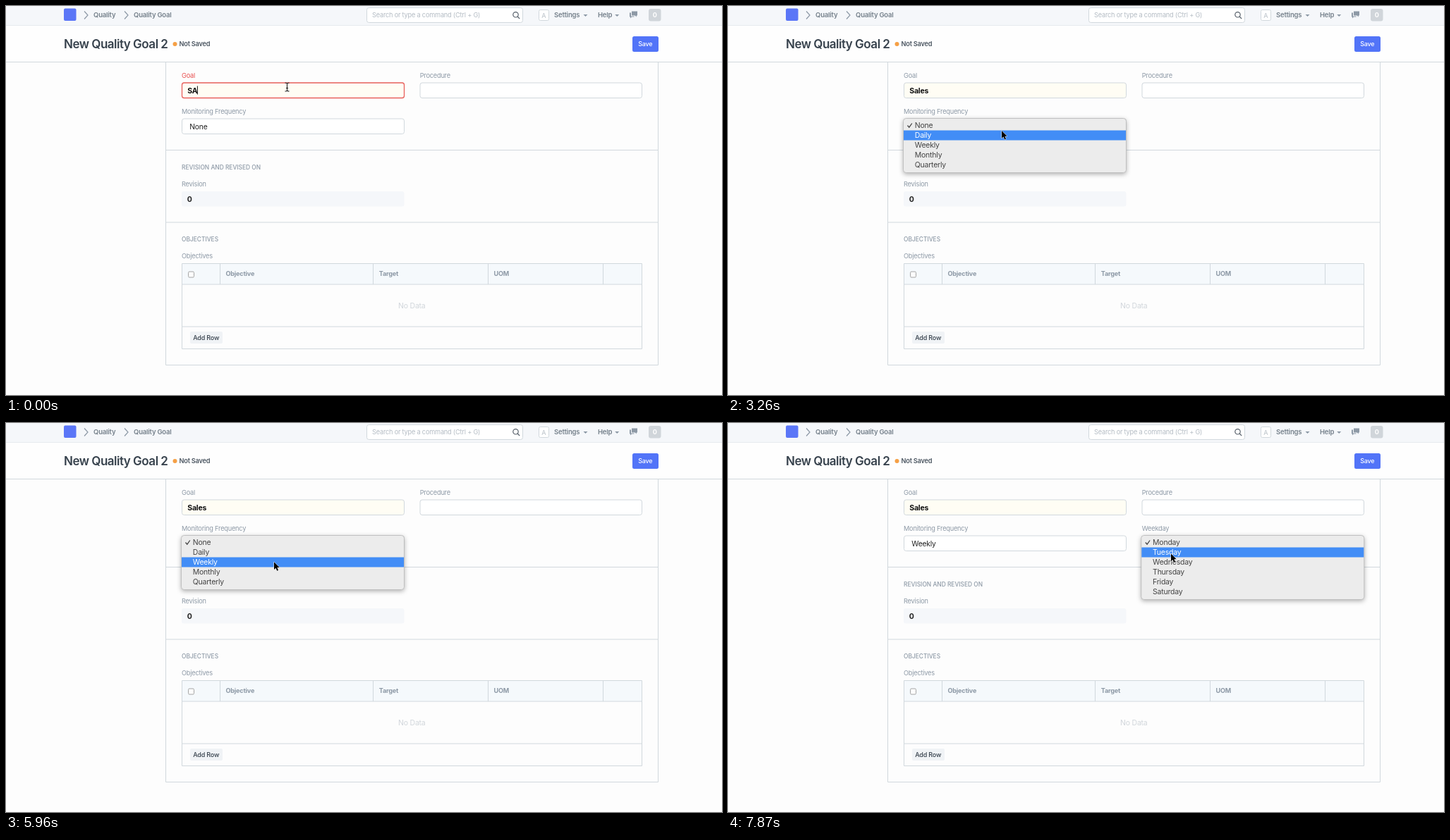
An HTML page that plays this animation: 1015x552 px, repeating every 8000 ms.

```html
<!DOCTYPE html>
<html lang="en">
<head>
<meta charset="utf-8">
<title>New Quality Goal</title>
<style>
  html, body { margin: 0; width: 100%; height: 100%; overflow: hidden; background: #fdfdfd; }
  svg { display: block; width: 100%; height: 100%; }
  text { font-family: Inter, sans-serif; letter-spacing: -.022em; white-space: pre; fill: #8d99a6; font-size: 9.2px; }
  .nav { font-size: 9.5px; font-weight: 600; fill: #75808b; }
  .section { font-size: 8.4px; font-weight: 500; letter-spacing: 0; }
  .head { font-size: 9.1px; font-weight: 700; }
  .value { font-size: 10.3px; fill: #222; }
  .bold { font-size: 10.5px; font-weight: 700; fill: #111; }
  .item { font-size: 10.5px; fill: #444; }
  .mid { text-anchor: middle; }
  .line { fill: none; stroke: #d1d8dd; }
  .field { fill: #fff; stroke: #d1d8dd; }
  .popup { filter: drop-shadow(0 2px 3px rgba(0, 0, 0, .3)); }
  .tick { fill: none; stroke: #444; stroke-width: 1.3; }
  .on { fill: #fff; }
  .tick.on { fill: none; stroke: #fff; }
</style>
</head>
<body>
<svg viewBox="0 0 1015 552">
  <!-- Navigation bar -->
  <rect width="1015" height="27" fill="#f5f7fa"/>
  <path class="line" d="M0 27.5H1015" style="stroke:#e6eaee"/>
  <rect x="82" y="3.5" width="17.5" height="17.5" rx="2" fill="#5b76f7"/>
  <path d="M111 7.5l5 5.5-5 5.5M168 7.5l5 5.5-5 5.5" fill="none" stroke="#8d99a6" stroke-width="1.2"/>
  <text class="nav" x="124" y="16.4">Quality</text>
  <text class="nav" x="181" y="16.4">Quality Goal</text>
  <rect class="field" x="511.5" y="2.5" width="221" height="21" rx="3"/>
  <text x="519" y="16.4" style="fill:#b4bcc4">Search or type a command (Ctrl + G)</text>
  <g fill="none" stroke="#555f69" stroke-width="1.2"><circle cx="722.5" cy="12.3" r="3.7"/><path d="M725.2 15l3 3.2"/></g>
  <rect class="field" x="755.5" y="5.5" width="14" height="15" rx="2"/>
  <text class="mid" x="762.3" y="16.5" style="fill:#b9c1c8">A</text>
  <text class="nav" x="777" y="16.4">Settings</text>
  <text class="nav" x="839" y="16.4">Help</text>
  <path d="M818.5 12h6l-3 3zM863.2 12h6l-3 3z" fill="#8d99a6"/>
  <path d="M887 7.5h8v6h-1.2v2l-2-2H887zM884 9.5h2v5h4.5v1H887l-2 2v-2h-1z" fill="#8d99a6"/>
  <rect x="911" y="4" width="17.5" height="17.5" rx="3" fill="#d0d5da"/>
  <text class="head mid" x="919.7" y="16" style="fill:#fff">0</text>

  <!-- Page header -->
  <rect y="28" width="1015" height="51" fill="#fefefe"/>
  <path class="line" d="M0 79.5H1015"/>
  <text x="82" y="60.4" style="font-size:17px;font-weight:600;letter-spacing:-.5px;fill:#36414c">New Quality Goal 2</text>
  <circle cx="239.5" cy="54" r="3" fill="#f5a045"/>
  <text x="245.5" y="57.2" style="font-weight:600;fill:#4a5560">Not Saved</text>
  <rect x="888" y="43" width="37" height="22" rx="2.5" fill="#5274f8"/>
  <text class="mid" x="906.3" y="57.2" style="font-size:9px;font-weight:500;fill:#fff">Save</text>

  <!-- Form -->
  <path class="line" d="M226.5 80V509.5H924.5V80M226.5 204.5H924.5M226.5 307H924.5"/>
  <text id="goalLabel" x="249" y="102">Goal</text>
  <rect id="goalField" x="249.5" y="109" width="315" height="21.5" rx="3" fill="#fffdf4"/>
  <text id="goal" class="bold" x="257.3" y="123.5"></text>
  <path id="caret" d="M0 113.5V125.5" stroke="#111"/>
  <text x="586.7" y="102">Procedure</text>
  <rect class="field" x="587" y="109" width="314.5" height="21.5" rx="3"/>
  <text x="249" y="153">Monitoring Frequency</text>
  <rect class="field" x="249.5" y="160" width="315" height="21.5" rx="3"/>
  <rect id="focusRing" x="257.5" y="163.5" width="299" height="14.5" fill="none" stroke="#8f8f8f" stroke-width=".8"/>
  <text id="frequency" class="value" x="260.3" y="175"></text>
  <g id="weekday">
    <text x="586.7" y="153">Weekday</text>
    <rect class="field" x="587" y="160" width="314.5" height="21.5" rx="3"/>
    <text class="value" x="597.8" y="175">Monday</text>
  </g>
  <text class="section" x="249" y="231.5">REVISION AND REVISED ON</text>
  <text x="249" y="255.5">Revision</text>
  <rect x="249" y="263" width="315.5" height="21.5" rx="3" fill="#f5f7fa"/>
  <text class="bold" x="256.8" y="278" style="fill:#222">0</text>

  <!-- Objectives table -->
  <text class="section" x="249" y="334">OBJECTIVES</text>
  <text x="249" y="358.3">Objectives</text>
  <rect x="249.5" y="365.5" width="652" height="29.5" fill="#f5f9fc"/>
  <path class="line" d="M249.5 365.5H901.5V486.5H249.5ZM249.5 395H901.5M249.5 455H901.5M303.5 365.5V395M520.5 365.5V395M683.5 365.5V395M846.5 365.5V395"/>
  <rect x="258.5" y="377" width="8" height="8" rx="1.5" fill="#fff" stroke="#9a9a9a" stroke-width=".9"/>
  <text class="head" x="311.5" y="383">Objective</text>
  <text class="head" x="528.7" y="383">Target</text>
  <text class="head" x="691.5" y="383">UOM</text>
  <text class="mid" x="575.3" y="428.7" style="font-size:10.5px;fill:#d1d6db">No Data</text>
  <rect x="261" y="462" width="46" height="17" rx="2" fill="#f0f3f6"/>
  <text class="mid" x="283.7" y="473.7" style="font-size:9px;font-weight:500;fill:#36414c">Add Row</text>

  <g id="frequencyMenu" class="popup"></g>
  <g id="weekdayMenu" class="popup"></g>
  <path id="beam" d="M-3-6Q0-6 0-4.5Q0-6 3-6M0-5V5M-3 6Q0 6 0 4.5Q0 6 3 6M-1.5 1.5H1.5" fill="none" stroke="#222" stroke-width="1.1"/>
  <path id="arrow" d="M0 0V10.8L2.5 8.5 4.2 12.4 6 11.6 4.4 7.8H7.7Z" stroke="#fff" stroke-width="1" paint-order="stroke"/>
</svg>
<script>
const LOOP = 8000, ROW = 14, MENU_TOP = 162.5;
const $ = id => document.getElementById(id);

// Each step holds its value from its start time until the next one.
const typing = [[0, 'SA'], [150, 'S'], [300, 'Sa'], [440, 'Sale'], [740, 'Sales'], [880, 'Sales '], [1620, 'Sales']];
const pointer = [
  [0, 398.5, 115], [1920, 398.5, 118.5], [2070, 398.5, 126], [2220, 398, 146], [2370, 398, 173],
  [2660, 390, 173], [2810, 389, 173.5],
  [3110, 389, 175], [3260, 388, 177], [3410, 387, 180], [3560, 385, 184], [3710, 384, 187],
  [4160, 384, 188], [4310, 384, 194], [4610, 383, 195.5], [4760, 382, 196.5], [4910, 381, 198], [5960, 380, 197.3],
  [6700, 392, 195], [6840, 450, 187], [6990, 540, 177], [7130, 605, 171], [7280, 628, 171], [7870, 628, 185.5]
];
const held = (steps, t) => steps.findLast(([start]) => start <= t);
const within = (t, from, to) => t >= from && t < to;
const show = (id, visible) => $(id).style.display = visible ? '' : 'none';

function buildMenu(id, x, items) {
  const rows = items.map((label, i) => {
    const y = MENU_TOP + i * ROW;
    const tick = i ? '' : `<path class="tick" d="M${x + 5.5} ${y + 7}l2.3 2.7 4-5.7"/>`;
    return `<g><rect x="${x}" y="${y}" width="315" height="${ROW}" fill="#428df6"/>${tick}
      <text class="item" x="${x + 15.8}" y="${y + 10.6}">${label}</text></g>`;
  });
  $(id).innerHTML = `<rect x="${x - .5}" y="159.5" width="316" height="${items.length * ROW + 7}" rx="4"
    fill="#ececec" stroke="#b8b8b8" stroke-width=".8"/>${rows.join('')}`;
}

function updateMenu(id, visible, y) {
  show(id, visible);
  const active = Math.floor((y - MENU_TOP) / ROW);
  $(id).querySelectorAll('g').forEach((row, i) => {
    const [bar, ...marks] = row.children;
    bar.style.display = i === active ? '' : 'none';
    marks.forEach(mark => mark.classList.toggle('on', i === active));
  });
}

function render(t) {
  const [, x, y] = held(pointer, t);
  const editing = t < 2810;
  $('goalLabel').style.fill = editing ? '#e8504f' : '';
  $('goalField').style.stroke = editing ? '#e8605c' : '#d1d8dd';
  $('goalField').style.strokeWidth = editing ? 1.3 : 1;
  $('goal').textContent = held(typing, t)[1];
  show('caret', t < 2220 && !within(t, 1480, 1620));
  $('caret').setAttribute('transform', `translate(${257.3 + $('goal').getComputedTextLength()})`);

  $('frequency').textContent = t < 6550 ? 'None' : 'Weekly';
  show('focusRing', within(t, 2660, 7580));
  show('weekday', t >= 6550);
  updateMenu('frequencyMenu', within(t, 2660, 6410), y);
  $('frequencyMenu').style.opacity = t < 6260 ? 1 : .5;
  updateMenu('weekdayMenu', t >= 7580, y);

  const overText = t < 2220;
  show('beam', overText);
  show('arrow', !overText);
  $(overText ? 'beam' : 'arrow').setAttribute('transform', `translate(${x} ${y})`);
}

buildMenu('frequencyMenu', 249, ['None', 'Daily', 'Weekly', 'Monthly', 'Quarterly']);
buildMenu('weekdayMenu', 586.3, ['Monday', 'Tuesday', 'Wednesday', 'Thursday', 'Friday', 'Saturday']);

const begin = performance.now();
function tick() {
  render((performance.now() - begin) % LOOP);
  requestAnimationFrame(tick);
}
tick();
</script>
</body>
</html>
```
